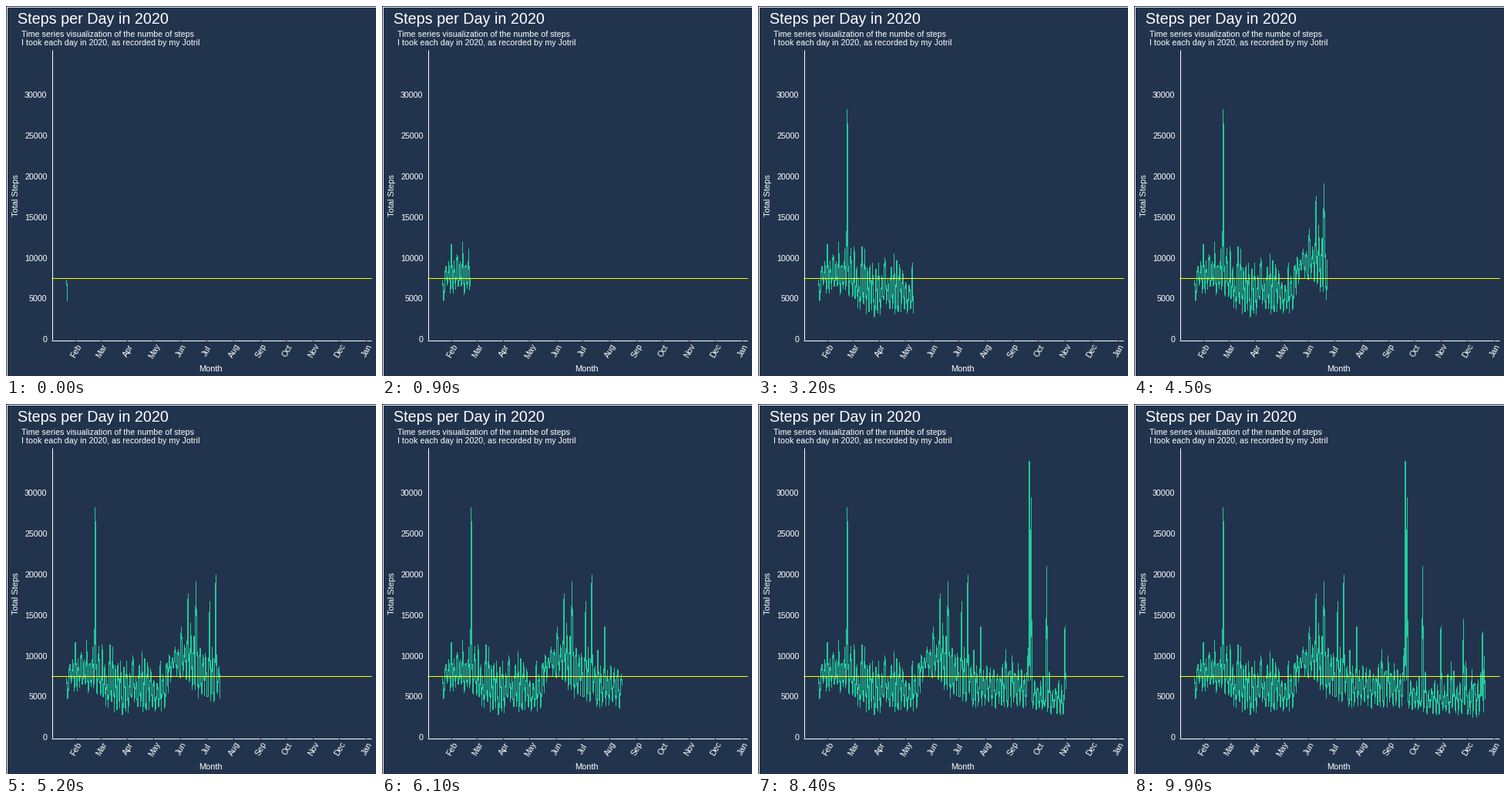
Write a matplotlib script that moves like this. It is 480 px wide and 480 px high and loops after 10 s.

```python
import math

import matplotlib.pyplot as plt
import numpy as np
from matplotlib.animation import FuncAnimation

SIZE, FRAMES, LAST_DAY = 480, 100, 335
NAVY, TEAL, YELLOW, WHITE = "#22344d", "#22c99c", "#ffff00", "#ffffff"
TICK = "#333333"

plt.rcParams["font.family"] = "Liberation Sans"

# day: (quiet level, busy level), in thousands of steps
SEASONS = {0: (6.0, 11.5), 38: (5.5, 12.0), 48: (3.0, 11.5), 112: (2.8, 11),
           124: (8.0, 14.0), 150: (5.0, 14.5), 180: (3.8, 12.0),
           240: (4.0, 11.0), 260: (3.0, 8.0), 335: (2.5, 10.0)}

# day: thousands of steps on the outstanding days
SPIKES = {0: 7.3, 1: 4.8, 33: 28.2, 140: 17.6, 149: 19.1, 165: 16.7,
          172: 20.0, 187: 13.6, 243: 33.9, 245: 29.5, 263: 21.0,
          284: 13.7, 310: 14.5, 332: 13.0}


def make_steps():
    """Irregular swings of a few days between the quiet and busy levels."""
    rng = np.random.default_rng(2020)
    days = np.arange(LAST_DAY + 1)
    quiet, busy = (np.interp(days, list(SEASONS), level)
                   for level in zip(*SEASONS.values()))
    phase = np.cumsum(rng.uniform(0.9, 2.6, days.size))
    swing = (0.5 - 0.5 * np.cos(phase)) * rng.uniform(0.45, 1.05, days.size)
    steps = quiet * rng.uniform(0.9, 1.1, days.size) + (busy - quiet) * swing
    steps[list(SPIKES)] = list(SPIKES.values())
    return steps * 1000


def day_x(day):
    return 78.75 + 1.1245 * day


def step_y(steps):
    return 432.8 - 0.010567 * steps


def label(x, y, text, size=10.6, **kw):
    ax.text(x, y, text, size=size, color=WHITE, va="baseline",
            rotation_mode="anchor", **kw)


def rule(xs, ys, color=WHITE, z=2):
    ax.plot(xs, ys, color=color, lw=1, zorder=z, snap=True,
            solid_capstyle="butt", solid_joinstyle="miter")


fig = plt.figure(figsize=(SIZE / 72, SIZE / 72), dpi=72, facecolor=NAVY)
ax = fig.add_axes([0, 0, 1, 1])
ax.set(xlim=(0, SIZE), ylim=(SIZE, 0))
ax.axis("off")

edge = SIZE - 0.5
rule([0.5, edge, edge, 0.5, 0.5], [0.5, 0.5, edge, edge, 0.5])
rule([59.5, 59.5], [57, 433])
rule([59, 474], [433.5, 433.5])
rule([59, 474], [352.5, 352.5], YELLOW, 4)

label(15, 23, "Steps per Day in 2020", 19.8)
label(20.5, 40, "Time series visualization of the numbe of steps")
label(20.5, 51, "I took each day in 2020, as recorded by my Jotril")
label(265.5, 474, "Month", 11, ha="center")
label(15.5, 246, "Total Steps", 11, ha="center", rotation=90)

for v in range(0, 30001, 5000):
    label(53.5, round(step_y(v) + 3.4), str(v), ha="right")

month_days = [29, 31, 30, 31, 30, 31, 31, 30, 31, 30, 31]
starts = 10 + np.cumsum([0] + month_days)
names = "Feb Mar Apr May Jun Jul Aug Sep Oct Nov Dec Jan".split()
for name, day in zip(names, starts):
    x = day_x(day)
    rule([x, x], [433, 436], TICK, 3)
    label(x + 4, 449, name, ha="center", rotation=60)

xs = day_x(np.arange(LAST_DAY + 1))
ys = step_y(make_steps())
# A hairline without antialiasing gives crisp one-pixel strokes
line, = ax.plot([], [], color=TEAL, lw=0.1, zorder=3, antialiased=False,
                solid_joinstyle="bevel", solid_capstyle="butt")


def update(i):
    day = math.ceil(1 + (LAST_DAY - 1) * i / (FRAMES - 1))
    line.set_data(xs[:day + 1], ys[:day + 1])
    return line,


anim = FuncAnimation(fig, update, frames=FRAMES, interval=100, repeat=True,
                     repeat_delay=0)
plt.show()
```
